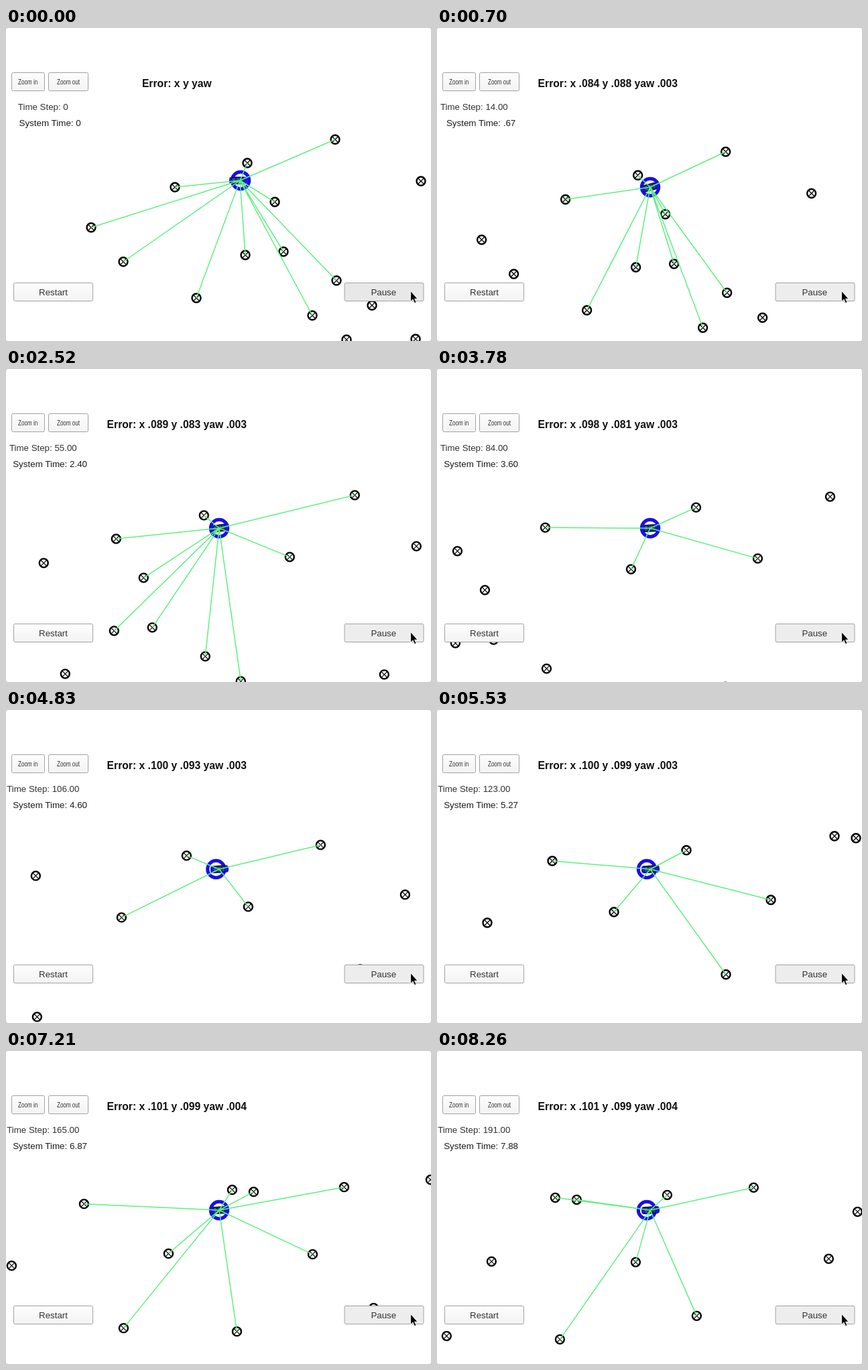
Recreate the animation shown at these times as an HTML page. Size 634 by 466 pixels, loop 8.33 s.

```html
<!DOCTYPE html>
<html lang="en">
<head>
<meta charset="utf-8">
<title>Landmark localization</title>
<style>
  html, body { margin: 0; width: 100%; height: 100%; overflow: hidden; background: #c4c4c4; }
  svg { display: block; width: 634px; height: 466px; font-family: "Liberation Sans", Arial, sans-serif; }
  text { text-anchor: middle; fill: #323232; font-size: 13.3px; }
  .button rect { fill: url(#face); stroke: #a2a2a2; }
  .small { font-size: 10.5px; }
  #error { font-size: 15.7px; font-weight: bold; fill: #111; }
  #clock { fill: #1c1c1c; font-size: 13.4px; }
  #rays { fill: none; stroke: #5ff080; stroke-width: 1.5; }
</style>
</head>
<body>
<svg viewBox="0 0 634 466">
  <defs>
    <linearGradient id="face" x2="0" y2="1">
      <stop stop-color="#fdfdfd"/>
      <stop offset="1" stop-color="#f3f3f3"/>
    </linearGradient>
    <g id="mark" fill="none" stroke="#000">
      <circle r="6.5" stroke-width="2.4"/>
      <path d="M-4.5-4.5 4.5 4.5M-4.5 4.5 4.5-4.5" stroke-width="1.2"/>
    </g>
  </defs>
  <rect width="634" height="466" rx="3" fill="#fff"/>

  <g id="marks"></g>
  <circle id="ring" r="12.7" fill="none" stroke="#1a0ee6" stroke-width="5"/>
  <g id="car">
    <rect x="-13" y="-5.5" width="27" height="11" rx="4" fill="#1717cf"/>
    <rect x="-8" y="-3.5" width="15" height="7" rx="1.5" fill="#2b5a86"/>
    <path d="M-10-4.5H9M-10 4.5H9M-3-3.5V3.5M4-3.5V3.5" stroke="#10103c" stroke-width="1.4"/>
  </g>
  <path id="rays"/>

  <g class="button">
    <rect x="8.5" y="66.5" width="49" height="27" rx="2"/>
    <text class="small" transform="translate(32.7 83.7) scale(.77 1)">Zoom in</text>
  </g>
  <g class="button">
    <rect x="63.5" y="66.5" width="59" height="27" rx="2"/>
    <text class="small" transform="translate(93 83.7) scale(.77 1)">Zoom out</text>
  </g>
  <g class="button">
    <rect x="11.5" y="379.5" width="118" height="27" rx="2"/>
    <text x="70.5" y="398">Restart</text>
  </g>
  <g class="button">
    <rect id="pause" x="505" y="379.5" width="118" height="27" rx="2"/>
    <text x="563.3" y="398">Pause</text>
  </g>
  <text id="error" x="254.8" y="88"></text>
  <text id="step" x="55.3" y="122"></text>
  <text id="clock" x="65.6" y="146"></text>
  <path d="M603.6 391.5V407L607 404 609.5 409.6 612 408.5 609.6 403.2H614Z" fill="#000" stroke="#fff" stroke-width=".9"/>
</svg>

<script>
const TICK = 70, TICKS = 119, RANGE = 240;
const $ = id => document.getElementById(id);

// Landmark points on the map
const marks = [
  [360, 201], [491, 166], [252, 237], [401, 259], [127, 297], [175, 348],
  [357, 338], [414, 333], [284, 402], [493, 376], [457, 428], [546, 413],
  [508, 464], [611, 463], [619, 228], [716, 136], [808, 212], [760, 403],
  [916, 120], [1042, 194], [1137, 99], [1169, 102], [1257, 195], [975, 305],
  [1144, 310], [1304, 95], [1433, 84], [1545, 190], [1588, 120], [1348, 275]
];

// The simulator's uneven pace: seconds and steps done
const pace = [[0, 0], [1.4, 29], [2.52, 55], [3.78, 84], [4.83, 106], [6.23, 140], [8.26, 191]];

function stepsAt(seconds) {
  const i = pace.findIndex(([s]) => s >= seconds) || 1;
  const [s0, n0] = pace[i - 1], [s1, n1] = pace[i];
  return Math.round(n0 + (n1 - n0) * (seconds - s0) / (s1 - s0));
}

// Distance driven: the car speeds up, and turns from a slope into a level run
const driveX = n => n * (1.662 + 0.0268 * n - 0.0000526 * n * n);
const driveY = n => 0.45 * n + 23.4 * (1 - Math.exp(-((n / 48) ** 2)));

// Errors in thousandths, settling along logistic curves
const rise = (n, middle, width) => 1 / (1 + Math.exp((middle - n) / width));
const mix = (a, b, u) => a + (b - a) * u;
const errors = {
  x: n => 83.9 + 0.003 * n + 16.15 * rise(n, 65, 12),
  y: n => mix(89 - 0.105 * n, 99, rise(n, 101, 5.5)),
  yaw: n => 2.6 + n / 140
};

const place = (id, x, y, turn = 0) =>
  $(id).setAttribute("transform", `translate(${x} ${y}) rotate(${turn})`);

const decimal = (value, digits) => value.toFixed(digits).replace(/^0/, "");

function draw(tick) {
  const seconds = tick * TICK / 1000;
  const started = tick > 0;
  const n = stepsAt(seconds);

  // The camera locks onto the car at the first step
  const dx = started ? -32 - driveX(n) : 0;
  const dy = started ? 10 + driveY(n) : 0;
  const [cx, cy] = started ? [318, 237] : [349, 227];
  const lag = tick % 7 % 2 ? 0 : Math.min(5, n / 23);

  place("marks", dx, dy);
  place("ring", started ? cx - lag : 350, cy);
  place("car", started ? cx : 346, cy, started ? -Math.max(3, 17 - n / 6) : 0);

  $("rays").setAttribute("d", marks
    .map(([x, y]) => [x + dx, y + dy])
    .filter(([x, y]) => Math.hypot(x - cx, y - cy) < RANGE)
    .map(([x, y]) => `M${cx} ${cy}L${x} ${y}`)
    .join(""));

  const error = Object.entries(errors).map(([key, value]) =>
    started ? `${key} ${decimal(Math.round(value(n)) / 1000, 3)}` : key);
  $("error").textContent = "Error: " + error.join(" ");
  $("step").textContent = "Time Step: " + (started ? n.toFixed(2) : "0");
  $("clock").textContent = "System Time: " + (started ? decimal(seconds * 0.9534, 2) : "0");
  $("pause").style.fill = started ? "#ededed" : "#e8e8e8";
}

$("marks").innerHTML = marks.map(([x, y]) => `<use href="#mark" x="${x}" y="${y}"/>`).join("");

const start = performance.now();
let shown = -1;
function loop() {
  const tick = Math.floor((performance.now() - start) / TICK) % TICKS;
  if (tick !== shown) draw(shown = tick);
  requestAnimationFrame(loop);
}
loop();
</script>
</body>
</html>
```
